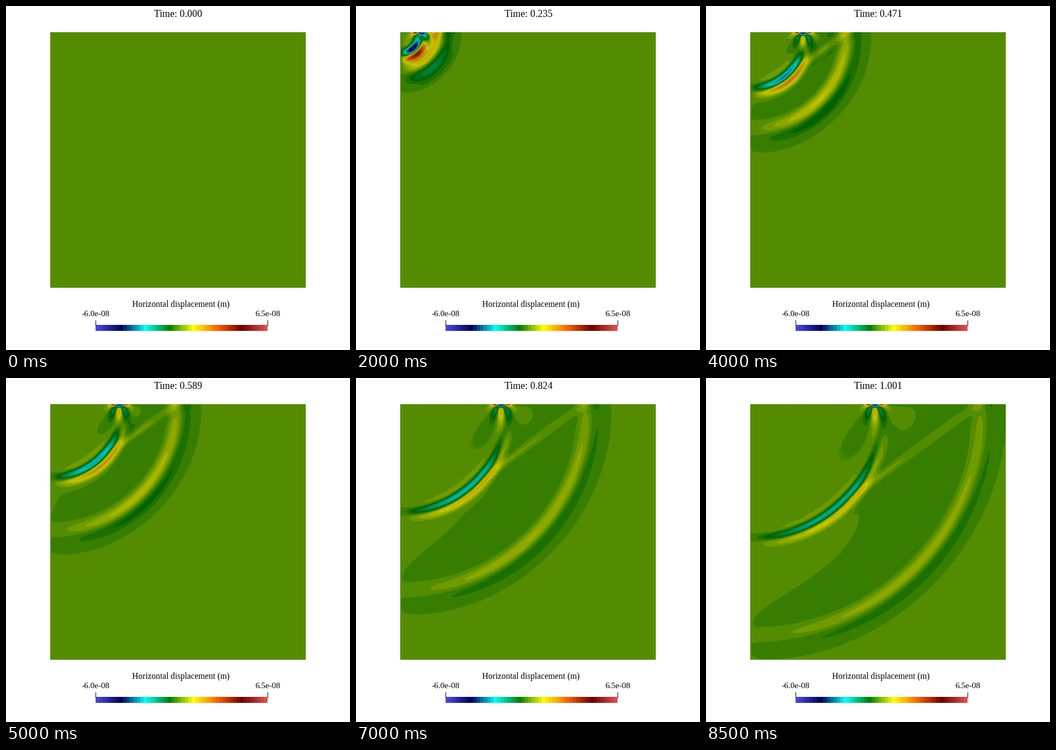
A matplotlib script for the animation above (8.75 s loop, 630 px wide and 630 px high).

```python
import numpy as np
import matplotlib.pyplot as plt
from matplotlib.animation import FuncAnimation
from matplotlib.colors import LinearSegmentedColormap, ListedColormap

plt.rcParams["font.family"] = "Liberation Serif"

STAGE, DPI = 630, 100
FRAMES, INTERVAL = 35, 250
FRAME_DT = 0.02943               # simulated seconds per frame

# Elastic half space, lengths in pixels, unit density
SIZE = 468                       # visible grid
VP = 467.0
VS = VP / np.sqrt(3)
SUBSTEPS = 24
DT = FRAME_DT / SUBSTEPS
DAMPING = 1.2e-5                 # suppresses grid-scale ringing
FREQ, DELAY, RAMP = 9.0, 0.080, 0.02

# Colour range in units of 1e-8 m
LOW, HIGH, BANDS = -6.0, 6.4937, 50
P_PEAK = 0.75                    # P crest on the diagonal at CREST_FRAME
CREST_FRAME = 28
SHADE = 0.77

STOPS = [
    (0.0, (0.278, 0.278, 0.859)),
    (0.143, (0.0, 0.0, 0.361)),
    (0.285, (0.0, 1.0, 1.0)),
    (0.429, (0.0, 0.502, 0.0)),
    (0.571, (1.0, 1.0, 0.0)),
    (0.714, (1.0, 0.38, 0.0)),
    (0.857, (0.42, 0.0, 0.0)),
    (1.0, (0.878, 0.302, 0.302)),
]


def bump(t):
    """Gaussian that rises smoothly from rest at t = 0."""
    s = np.clip(t / RAMP, 0, 1)
    onset = s ** 3 * (10 - 15 * s + 6 * s ** 2)
    return np.exp(-(np.pi * FREQ * (t - DELAY)) ** 2) * onset


def force(t):
    """Ricker pulse without net impulse: curvature of the bump."""
    curve = bump(t + DT) - 2 * bump(t) + bump(t - DT)
    return -curve / (2 * (np.pi * FREQ * DT) ** 2)


def simulate():
    """Staggered-grid waves from a vertical load on a free surface.

    The left side is the symmetry axis. Returns the horizontal
    displacement at every frame.
    """
    total = SIZE + 10
    mu = VS ** 2
    lam = VP ** 2 - 2 * mu
    stiff = lam + 2 * mu
    plate = 4 * mu * (lam + mu) / stiff
    u, w, du, dw = (np.zeros((total, total)) for _ in range(4))
    lag = DAMPING / DT
    shots = [u[:SIZE, :SIZE].astype(np.float32)]

    for step in range((FRAMES - 1) * SUBSTEPS):
        t = step * DT
        n = min(total, int(VP * t) + 16)     # nothing moves beyond the front
        a = u[:n, :n] + lag * du[:n, :n]
        b = w[:n, :n] + lag * dw[:n, :n]

        ux = np.diff(a, axis=1)
        wz = np.diff(b, axis=0)[:, :-1]
        sxx = stiff * ux
        sxx[1:] += lam * wz
        sxx[0] = plate * ux[0]
        szz = lam * ux
        szz[1:] += stiff * wz
        szz[0] = 0
        szz[0, 0] = -force(t) * mu
        sxz = mu * np.diff(a, axis=0)
        sxz[:, 1:] += mu * np.diff(b, axis=1)[:-1]

        acc = np.diff(sxx, axis=1)
        acc[1:-1] += np.diff(sxz, axis=0)[:, 1:-1]
        acc[0] += 2 * sxz[0, 1:-1]
        du[:n - 1, 1:n - 1] += DT ** 2 * acc[:-1]
        dw[:n - 1, :n - 1] += DT ** 2 * (np.diff(sxz, axis=1)
                                         + np.diff(szz, axis=0))
        u[:n, :n] += du[:n, :n]
        w[:n, :n] += dw[:n, :n]

        if (step + 1) % SUBSTEPS == 0:
            shots.append(u[:SIZE, :SIZE].astype(np.float32))

    crest = np.diagonal(shots[CREST_FRAME])[225:260].max()
    return [shot * (P_PEAK / crest) for shot in shots]


def label(x, y, text, px):
    return ax.text(x, y, text, fontsize=px * 72 / DPI, color="black",
                   ha="center", va="baseline")


waves = simulate()

ramp = LinearSegmentedColormap.from_list("bands", STOPS, N=1024)
colors = ramp(np.linspace(0, 1, BANDS))[:, :3]
bar_map = ListedColormap(colors)
field_map = ListedColormap(colors * SHADE)

fig = plt.figure(figsize=(STAGE / DPI, STAGE / DPI), dpi=DPI, facecolor="white")
ax = fig.add_axes([0, 0, 1, 1])

field = ax.imshow(waves[0], cmap=field_map, vmin=LOW, vmax=HIGH,
                  extent=(81, 549, 516, 48), interpolation="nearest")
ax.imshow(np.arange(BANDS)[None, :], cmap=bar_map, extent=(164, 479, 595, 584),
          interpolation="nearest")
ax.set(xlim=(0, STAGE), ylim=(STAGE, 0), aspect="auto")
ax.axis("off")

clock = label(315.5, 20, "Time: 0.000", 18.2)
label(320, 551, "Horizontal displacement (m)", 15.5)
for x, text in ((164, "-6.0e-08"), (479, "6.5e-08")):
    label(x, 568.5, text, 15.2)
    ax.plot([x, x], [574.5, 585], color="black", lw=0.72,
            solid_capstyle="butt")


def draw(i):
    field.set_data(waves[i])
    clock.set_text(f"Time: {i * FRAME_DT:.3f}")
    return field, clock


anim = FuncAnimation(fig, draw, frames=FRAMES, interval=INTERVAL,
                     repeat=True, repeat_delay=0, blit=False)
plt.show()
```
